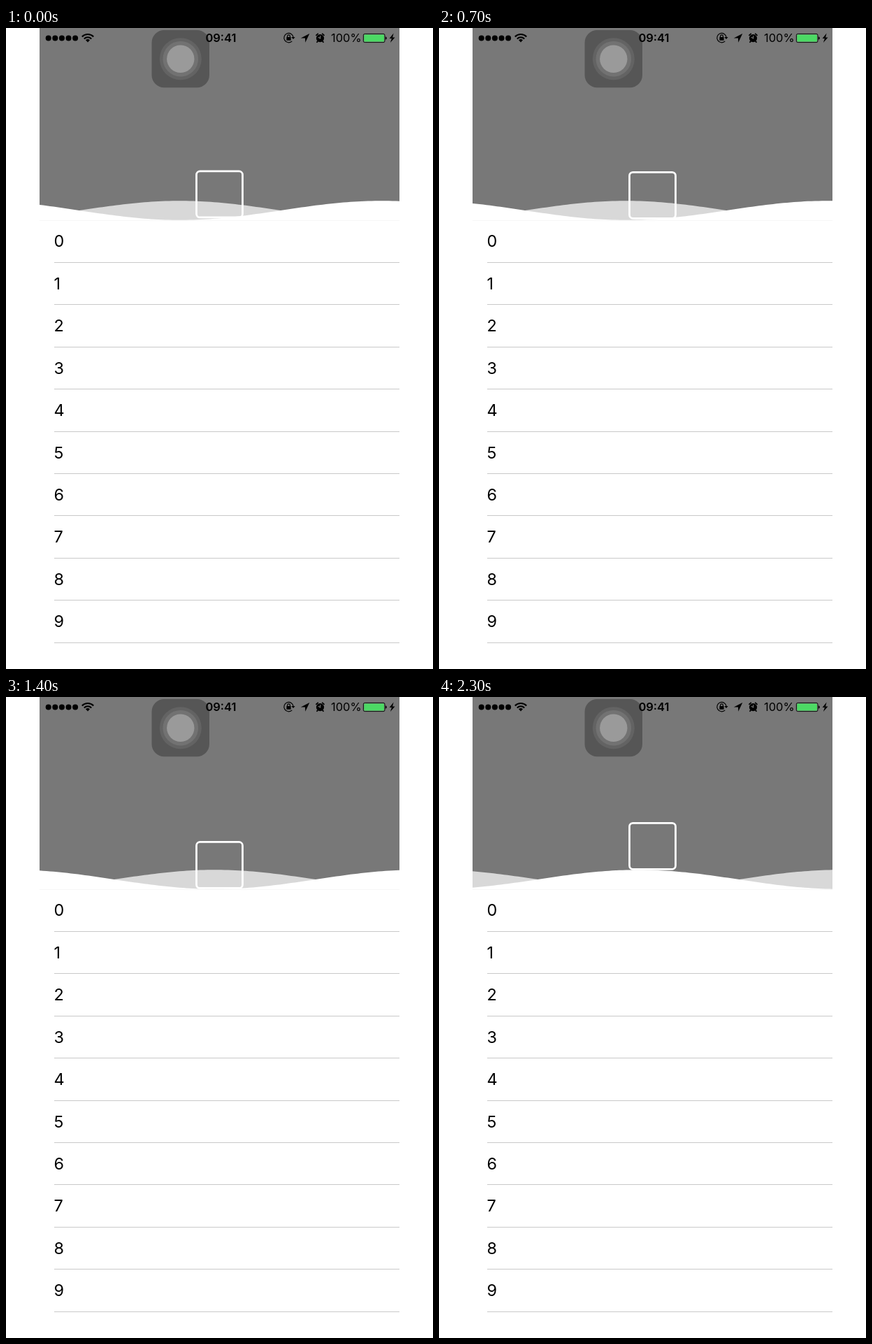
An HTML page that plays this animation: 611 px wide and 917 px high, repeating every 2.4 s.

```html
<!DOCTYPE html>
<html lang="en">
<head>
<meta charset="utf-8">
<title>Wave header</title>
<style>
  html, body { margin: 0; width: 100%; height: 100%; overflow: hidden; background: #fff; }
  svg { display: block; width: 611px; height: 917px; }
  text { font-family: Inter, "Liberation Sans", sans-serif; }
  .row { font-size: 23.4px; }
  .status { font-size: 16.5px; }
</style>
</head>
<body>
<svg viewBox="0 0 611 917">
  <rect width="611" height="917" fill="#fff"/>
  <rect x="48" width="515" height="275" fill="#787878"/>
  <path id="backWave" fill="#d8d8d8"/>
  <path id="frontWave" fill="#fff"/>
  <rect id="box" x="272.5" width="66" height="66" rx="5" fill="none" stroke="#fff" stroke-width="2.75"/>

  <g id="touch">
    <rect x="208.5" y="3" width="82.5" height="82.3" rx="18" fill="#565656"/>
    <circle cx="249.8" cy="44.2" r="30" fill="#636363"/>
    <circle cx="249.8" cy="44.2" r="25.3" fill="#727272"/>
    <circle cx="249.8" cy="44.2" r="19.7" fill="#9a9a9a"/>
  </g>

  <g id="statusBar">
    <g id="signal"></g>
    <g fill="none" stroke="#000" stroke-width="2.1">
      <path d="M108.8 12.4a11.6 11.6 0 0 1 16.4 0"/>
      <path d="M111.8 15.4a7.4 7.4 0 0 1 10.4 0"/>
    </g>
    <path d="M117 20.4l-3-3.1a4.2 4.2 0 0 1 6 0z"/>
    <text class="status" x="307.5" y="20.2" font-weight="600" text-anchor="middle">09:41</text>
    <g fill="none" stroke="#000" stroke-width="1.2">
      <path d="M409.3 18.8a6.7 6.7 0 1 1 1.9-5.5"/>
      <path d="M402.6 13.4v-1.6a1.9 1.9 0 0 1 3.8 0v1.6"/>
    </g>
    <rect x="401.4" y="13.1" width="6.2" height="4.6" rx=".5"/>
    <path d="M408.4 12.9h5.2l-2.6 3.2z"/>
    <path d="M434.3 8L421.8 14.4l6.2.1.3 6.2z"/>
    <circle cx="449.5" cy="14.6" r="5.6"/>
    <g fill="none" stroke="#000" stroke-width="1.8" stroke-linecap="round">
      <path d="M444 10.3l2.2-2M455 10.3l-2.2-2M446 19.2l-1 1M453 19.2l1 1"/>
    </g>
    <path d="M449.7 11v3.8l-3-1.6" fill="none" stroke="#787878" stroke-width="1.1"/>
    <text class="status" x="465" y="20.2">100%</text>
    <rect x="511.4" y="8.4" width="30.6" height="12.2" rx="2" fill="#787878" stroke="#000" stroke-width=".9"/>
    <rect x="512.4" y="9.4" width="28.6" height="10.2" rx="1" fill="#4cd964"/>
    <path d="M543 12.2a2.4 2.4 0 0 1 0 4.6z"/>
    <path d="M554.6 7.6l-6 7.5h3.3l-2 6 6.6-7.7h-3.4z"/>
  </g>
  <g id="rows"></g>
</svg>
<script>
const LEFT = 48, RIGHT = 563, BASE = 274.8;
const ROW = 60.445, MID = 261, AMP = 13.74, PERIOD = 576;
const LOOP = 2400, STEP = 100;
// Unwrapped crest position of the front wave: [ms, x]
const CREST = [[0, 537], [400, 875.5], [700, 1131.5], [1100, 1479.5],
               [1600, 1912], [2000, 2249.5], [2300, 2589]];
const byId = id => document.getElementById(id);

byId("signal").innerHTML = Array.from({ length: 5 }, (_, i) =>
  `<circle cx="${60.7 + 9.6 * i}" cy="14.5" r="4"/>`).join("");

byId("rows").innerHTML = Array.from({ length: 10 }, (_, i) => {
  const line = Math.round(BASE + ROW * (i + 1) - 0.5);
  return `<text class="row" x="68.4" y="${313.3 + ROW * i}">${i}</text>
    <rect x="69" y="${line}" width="494" height="1" fill="#c9c9c9"/>`;
}).join("");

function crestAt(ms) {
  let i = 0;
  while (i < CREST.length - 2 && ms >= CREST[i + 1][0]) i++;
  const [t0, x0] = CREST[i], [t1, x1] = CREST[i + 1];
  return x0 + (x1 - x0) * (ms - t0) / (t1 - t0);
}

const waveY = (x, crest) => MID - AMP * Math.cos((x - crest) * 2 * Math.PI / PERIOD);

function wavePath(crest) {
  let d = `M${LEFT} ${BASE + 1}`;
  for (let x = LEFT; x <= RIGHT; x += 5) d += `L${x} ${waveY(x, crest).toFixed(2)}`;
  return d + `L${RIGHT} ${BASE + 1}Z`;
}

function render(ms) {
  const crest = crestAt(Math.floor(ms / STEP) * STEP);
  byId("frontWave").setAttribute("d", wavePath(crest));
  byId("backWave").setAttribute("d", wavePath(crest + PERIOD / 2));
  byId("box").setAttribute("y", waveY(305.5, crest) - 67.3);
}

const start = performance.now();
function tick() {
  render((performance.now() - start) % LOOP);
  requestAnimationFrame(tick);
}
tick();
</script>
</body>
</html>
```
